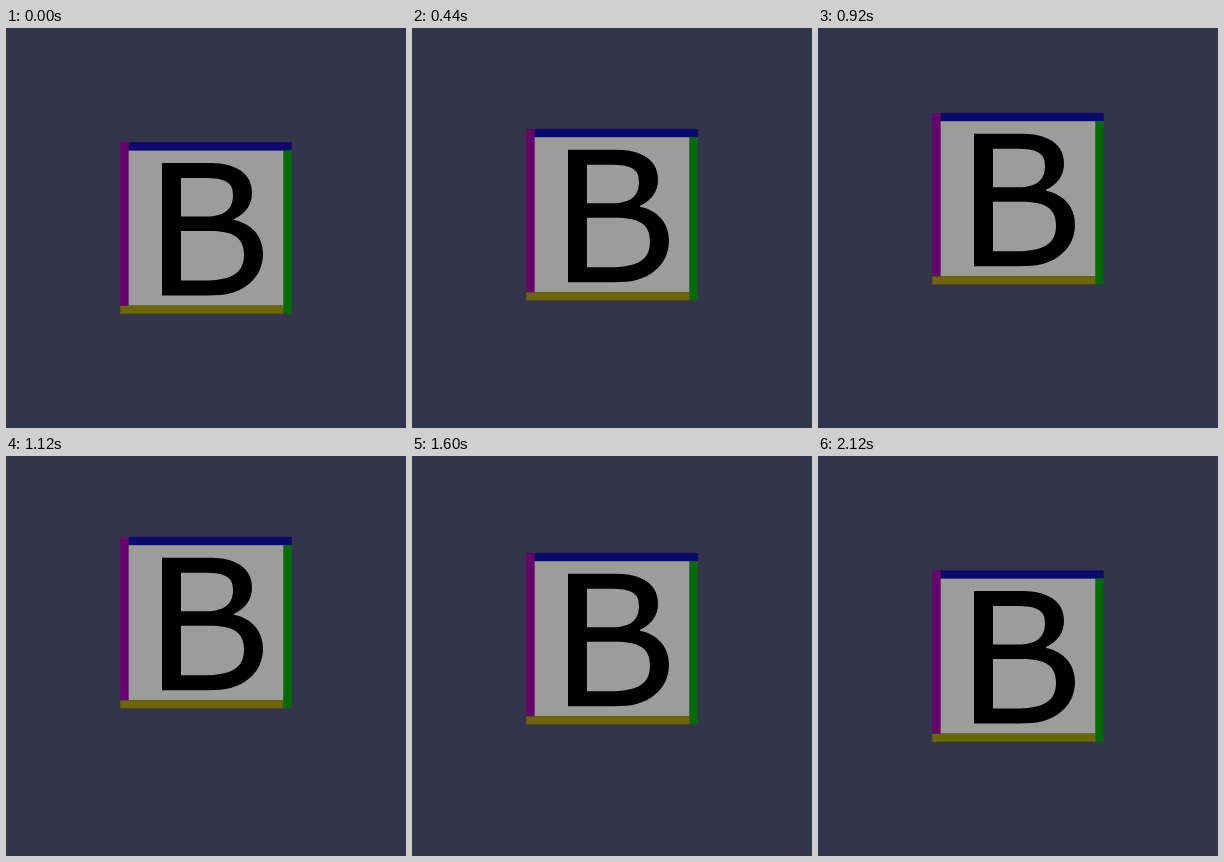
An HTML page with a canvas for the animation above (2.16 s loop, 400 px wide and 400 px high).

```html
<!DOCTYPE html>
<html lang="en">
<head>
<meta charset="utf-8">
<title>Floating block</title>
<style>
  html, body { margin: 0; width: 100%; height: 100%; overflow: hidden; background: #34344c; }
  canvas { display: block; }
</style>
</head>
<body>
<canvas id="stage" width="400" height="400" role="img" aria-label="B"></canvas>
<script>
const ctx = document.getElementById("stage").getContext("2d");
const LOOP = 2160;
const STEP = 40;
const SPEED = 1 / 30; // px per ms
const SIZE = 171.5;
const EDGE = 8.2;

// Wide humanist letterform: outline, then the two counters.
const LETTER = new Path2D(`
  M156 135 H201 C214 135 222 136 230 140 C241 145 246 154 246 165
  C246 177 239 186 228 191 V192 C246 196 257 208 257 226
  C257 238 252 248 244 255 C232 265 221 267.5 201 267.5 H156 Z
  M175 150 V188.5 H200 C219 188.5 227 181 227 167 C227 154 219 150 198 150 Z
  M175 203 V252.5 H197 C226 252.5 238 245 238 227 C238 209 227 203 203 203 Z`);

function rect(x, y, w, h, color) {
  ctx.fillStyle = color;
  ctx.fillRect(x, y, w, h);
}

// Steady rise, then steady fall, with a short rest at the bottom.
function lift(t) {
  return Math.max(0, Math.min(t - STEP, LOOP - STEP - t)) * SPEED;
}

function drawBlock() {
  const left = 200 - SIZE / 2;
  const inner = left + EDGE;
  const far = left + SIZE - EDGE;
  const side = SIZE - EDGE;
  rect(inner, inner, far - inner, far - inner, "#9c9c9c");
  rect(inner, left, side, EDGE, "#0a0a6c");
  rect(far, inner, EDGE, side, "#006a04");
  rect(left, far, side, EDGE, "#6a6600");
  rect(left, left, EDGE, side, "#6a006c");
  ctx.fillStyle = "#000";
  ctx.fill(LETTER, "evenodd");
}

function frame(now) {
  const t = Math.floor((now % LOOP) / STEP) * STEP;
  rect(0, 0, 400, 400, "#34344c");
  ctx.save();
  ctx.translate(0, -lift(t));
  drawBlock();
  ctx.restore();
}

const start = performance.now();
function tick() {
  frame(performance.now() - start);
  requestAnimationFrame(tick);
}
tick();
</script>
</body>
</html>
```
